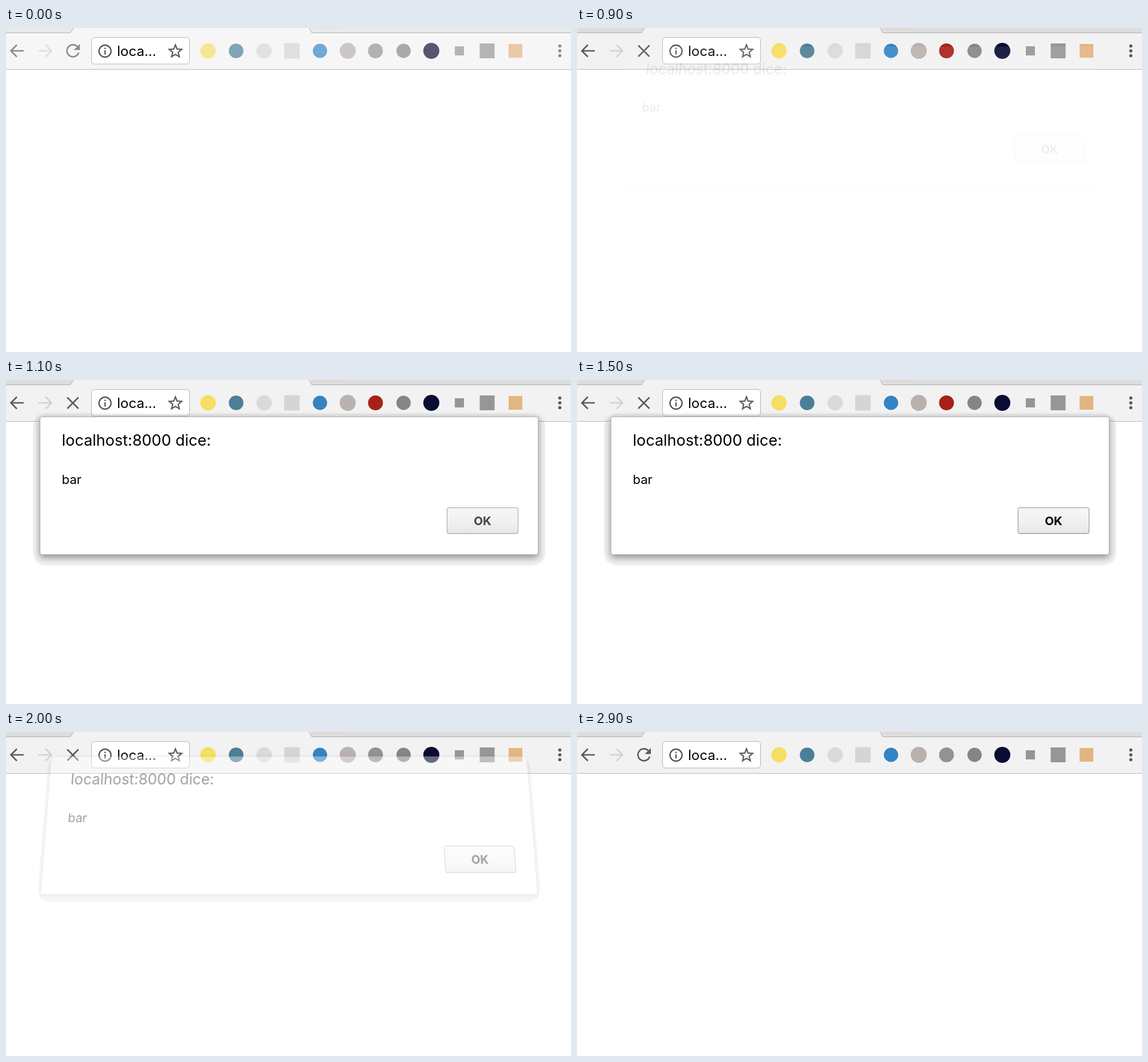
Write an HTML page that moves like this. It is 987 px wide and 567 px high and loops after 3000 ms.

```html
<!DOCTYPE html>
<html lang="es">
<head>
<meta charset="utf-8">
<title>Alert dialog</title>
<style>
html, body { margin: 0; width: 100%; height: 100%; overflow: hidden; background: #fff; }
body { position: relative; font-family: Inter, "Open Sans", sans-serif; }
svg { position: absolute; left: 0; top: 0; display: block; }
#dialog { position: absolute; left: 59px; top: 64px; width: 871px; height: 242px; transform-origin: 0 0; }
#dialog div { position: absolute; box-sizing: border-box; white-space: nowrap; }
#halo { border-radius: 23px; }
#panel { inset: 0; background: #fff; border: 1px solid #b4b4b4; border-radius: 4px; }
#title { left: 38.5px; top: 22px; font-size: 27px; line-height: 40px; color: #000; }
#message { left: 38.5px; top: 94px; font-size: 22px; line-height: 32px; color: #000; }
#ok { left: 711px; top: 159px; width: 125px; height: 46px; border: 1.5px solid #a6a6a6;
  border-radius: 3px; text-align: center; font-size: 20.6px; font-weight: 700; line-height: 45px;
  color: #444; background: linear-gradient(#f6f6f6, #f1f1f1 55%, #e6e6e6);
  box-shadow: 0 1px 1px rgba(0,0,0,.12); }
#ok.hover { color: #000; border-color: #8f8f8f; }
#ok.down { background: linear-gradient(#e3e3e3, #ebebeb 30%, #e8e8e8);
  box-shadow: inset 0 1px 2px rgba(0,0,0,.18); }
</style>
</head>
<body>
<svg width="987" height="567" viewBox="0 0 987 567">
  <rect id="bar" width="987" height="72"/>
  <g id="tabs" stroke="#b0b0b0">
    <path d="M-1-1H118.500L113.500 7Q113 8.500 111 8.500H-1Z"/>
    <path d="M529.500-1L533 7Q533.500 8.500 536 8.500H988V-1Z"/>
  </g>
  <path id="newTab" d="M541 0H586L584 1H543Z"/>
  <path d="M0 72.500H987" stroke="#b8b8b8"/>
  <rect x="149.500" y="16.500" width="171" height="46.500" rx="5" fill="#fff" stroke="#b5b5b5"/>
  <g fill="none" stroke="#5a5a5a" stroke-width="2.400">
    <circle cx="173" cy="40.500" r="10.500"/>
    <path d="M173 39V46.500M173 34.500V37"/>
    <path id="star" stroke-width="2.200"/>
  </g>
  <text x="194" y="49" font-size="24">loca...</text>
  <g id="tools">
    <g fill="none" stroke="#5a5a5a" stroke-width="2.600">
      <path d="M31 40H9M19 29.500L8.500 40L19 50.500"/>
      <path stroke="#d2d2d2" d="M57 40H79M69 29.500L79.500 40L69 50.500"/>
      <g id="reload">
        <path d="M127 43A10.500 10.500 0 1 1 124.600 32.600"/>
        <path d="M129 28V38.500H118.500Z" fill="#5a5a5a" stroke="none"/>
      </g>
      <path id="stop" d="M107 30.500L126.500 50M126.500 30.500L107 50"/>
    </g>
    <g id="icons"></g>
    <g fill="#5a5a5a">
      <circle cx="967.500" cy="31.500" r="2.800"/>
      <circle cx="967.500" cy="40" r="2.800"/>
      <circle cx="967.500" cy="48.500" r="2.800"/>
    </g>
  </g>
</svg>
<div id="dialog">
  <div id="halo"></div>
  <div id="panel"></div>
  <div id="title">localhost:8000 dice:</div>
  <div id="message">bar</div>
  <div id="ok">OK</div>
</div>
<script>
const $ = id => document.getElementById(id);
const LOOP = 3000, STEP = 100, W = 871, H = 242;

// Toolbar buttons: kind, centre x, half size, colour
const icons = [
  ['circle', 353, 13.5, '#f6df62'], ['circle', 402, 12.8, '#4b7f95'],
  ['circle', 451, 13.5, '#dadada'], ['rect', 499.5, 13.5, '#d5d5d5'],
  ['circle', 548.5, 12.5, '#3384c4'], ['circle', 597, 14, '#b9b1ae'],
  ['circle', 645.5, 13, '#929292'], ['circle', 694.5, 12.5, '#858585'],
  ['circle', 743, 14, '#0a0d33'], ['rect', 792, 8, '#969696'],
  ['rect', 840.5, 13, '#969696'], ['rect', 890, 12, '#e3b582']
].map(([kind, x, r, fill]) => {
  const el = document.createElementNS('http://www.w3.org/2000/svg', kind);
  const attrs = kind === 'circle' ? { cx: x, cy: 40, r } : { x: x - r, y: 40 - r, width: 2 * r, height: 2 * r };
  for (const key in attrs) el.setAttribute(key, attrs[key]);
  el.setAttribute('fill', fill);
  return $('icons').appendChild(el);
});

const starPoints = Array.from({ length: 10 }, (_, i) => {
  const a = i * Math.PI / 5 - Math.PI / 2, r = i % 2 ? 5 : 11.5;
  return (296 + r * Math.cos(a)).toFixed(2) + ' ' + (41 + r * Math.sin(a)).toFixed(2);
});
$('star').setAttribute('d', 'M' + starPoints.join('L') + 'Z');

const mix = (a, b, k) => Math.round(a + (b - a) * k);
const rgb = (...c) => `rgb(${c})`;

// How far the dialog has opened, 0 to 1
function openness(t) {
  if (t < 900 || t >= 2200) return 0;
  if (t < 1100) return t < 1000 ? 0.09 : 0.6;
  if (t < 2000) return 1;
  return t < 2100 ? 0.38 : 0.09;
}

// Perspective tilt: the top edge recedes while the panel lifts
function tilt(p) {
  const q = 1 - p, lift = -34.5 * q, cx = W / 2;
  const w0 = W / (W - 66 * q), w1 = W / (W - 5 * q * q), g = (w1 - w0) / H;
  const sy = ((lift + H) * w1 - lift * w0) / H;
  return `matrix3d(${[1, 0, 0, 0, cx * g, sy, 0, g, 0, 0, 1, 0, cx * (w0 - 1), lift * w0, 0, w0]})`;
}

function drawDialog(t) {
  const p = openness(t), box = $('dialog').style;
  box.visibility = p ? 'visible' : 'hidden';
  if (!p) return;
  box.opacity = p;
  box.transform = p === 1 ? 'none' : tilt(p);
  const side = 12 * p ** 0.9, shade = 0.42 * p;
  const halo = $('halo').style, panel = $('panel').style;
  halo.inset = `${-5 * p}px ${-side}px ${-19 * Math.sqrt(p)}px`;
  halo.background = `rgba(0,0,0,${Math.min(p / 4, 0.05 / p)})`;
  panel.boxShadow = `0 ${5 * p}px ${13 * p}px rgba(0,0,0,${shade})`;
  panel.borderColor = `rgba(0,0,0,${0.3 * p})`;
  const down = t >= 1800 && t < 2000;
  $('ok').className = (t >= 1400 ? 'hover' : '') + (down ? ' down' : '');
}

function draw(ms) {
  const t = Math.floor(ms % LOOP / STEP) * STEP;
  const focus = t < 200 ? 0 : t < 300 ? 0.5 : 1;
  const grey = mix(246, 242, focus), strip = mix(233, 220, focus);
  $('bar').setAttribute('fill', rgb(grey, grey, grey));
  $('tabs').setAttribute('fill', rgb(strip, strip, strip - 1));
  $('newTab').setAttribute('fill', rgb(mix(224, 212, focus), mix(224, 211, focus), mix(222, 202, focus)));
  $('tools').setAttribute('opacity', 0.68 + 0.32 * focus);

  const loading = t >= 800 && t < 2200;
  $('reload').style.display = loading ? 'none' : '';
  $('stop').style.display = loading ? '' : 'none';
  icons[6].setAttribute('fill', t >= 800 && t < 1600 ? '#a8201a' : '#929292');
  drawDialog(t);
}

const start = performance.now();
function tick() {
  draw(performance.now() - start);
  requestAnimationFrame(tick);
}
tick();
</script>
</body>
</html>
```
